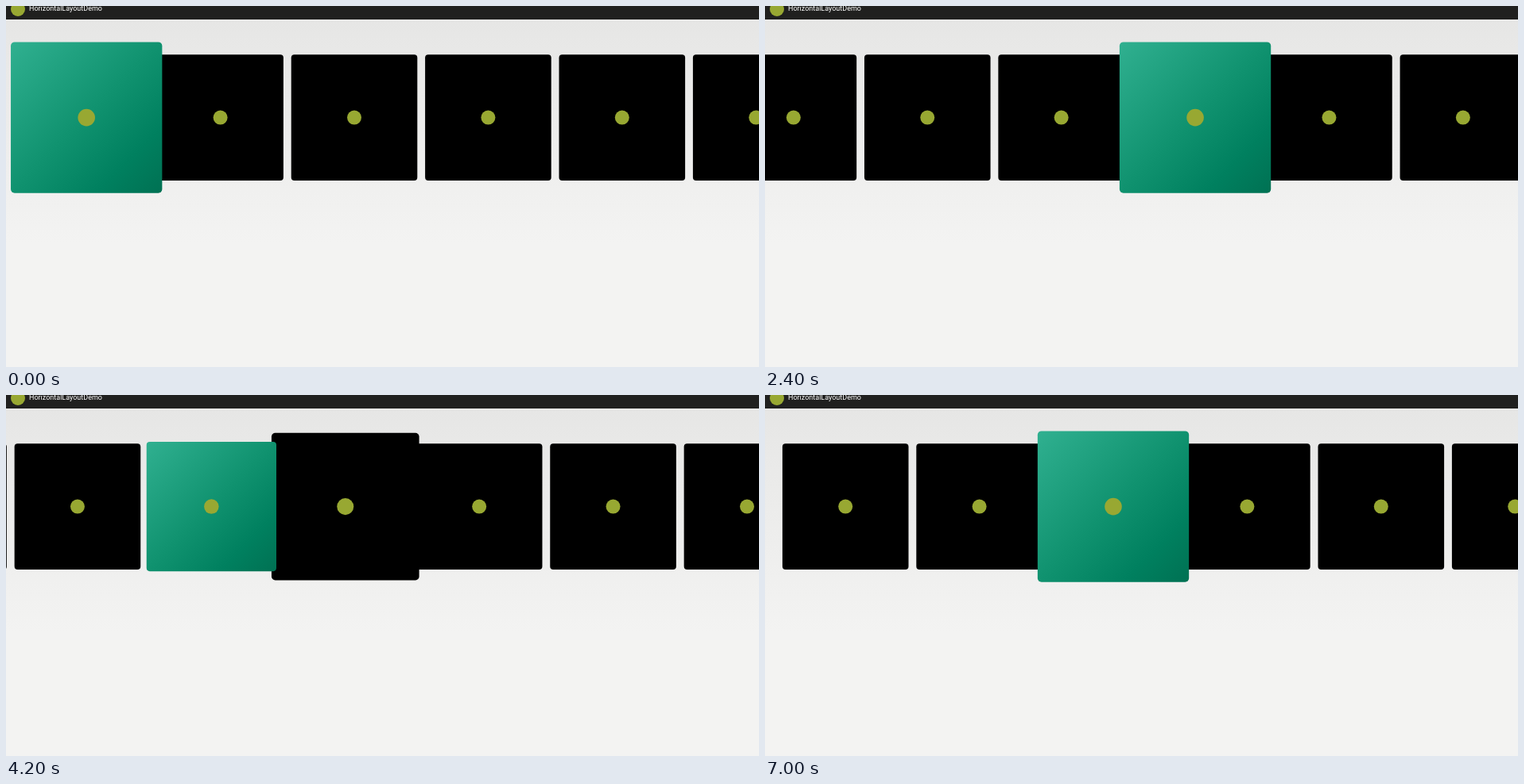
Animation, 947 px wide and 455 px high, one loop 8 s. Source, as an HTML page with a canvas:

```html
<!DOCTYPE html>
<html lang="en">
<head>
<meta charset="utf-8">
<title>Horizontal layout</title>
<style>
  html, body { margin: 0; width: 100%; height: 100%; overflow: hidden; background: #f3f3f2; }
  canvas { display: block; }
</style>
</head>
<body>
<canvas id="stage" width="947" height="455"></canvas>
<script>
const ctx = document.getElementById('stage').getContext('2d');
const WIDTH = 947, HEIGHT = 455, LOOP = 8000, TICK = 100;
const COUNT = 9, CARD = 158.6, PITCH = 168.4, FIRST_X = 101.2, CENTER_Y = 140.6;
const MAX_SCROLL = 613.8, GROWTH = 0.2, SCALE_MS = 180, SCROLL_MS = 380;

// Focus moves: [time, newly focused card]
const moves = [
  [450, 1], [840, 2], [1245, 3], [1540, 4], [1870, 5], [2146, 6], [2500, 7], [2850, 8],
  [3380, 7], [3660, 6], [3935, 5], [4155, 4], [4350, 3], [4555, 2], [4850, 1], [5300, 0],
  [6430, 1], [6790, 2],
];

const clamp = (v, lo, hi) => Math.max(lo, Math.min(hi, v));
const ease = u => 0.5 - 0.5 * Math.cos(Math.PI * clamp(u, 0, 1));
const cardX = i => FIRST_X + PITCH * i;
const scrollTarget = i => clamp(cardX(i) - WIDTH / 2, 0, MAX_SCROLL);

// Each move starts scrolling from wherever the previous one had got to.
function stateAt(time) {
  let focus = 0, previous = 0, from = 0, start = -1e4;
  const scrollAt = t => from + (scrollTarget(focus) - from) * ease((t - start) / SCROLL_MS);
  for (const [at, card] of moves) {
    if (at > time) break;
    from = scrollAt(at);
    previous = focus;
    focus = card;
    start = at;
  }
  return { focus, previous, scroll: scrollAt(time), grown: ease((time - start) / SCALE_MS) };
}

function linear(x0, y0, x1, y1, stops) {
  const gradient = ctx.createLinearGradient(x0, y0, x1, y1);
  for (const [offset, color] of stops) gradient.addColorStop(offset, color);
  return gradient;
}

function disc(x, y, radius) {
  ctx.fillStyle = '#98a832';
  ctx.beginPath();
  ctx.arc(x, y, radius, 0, 2 * Math.PI);
  ctx.fill();
}

const half = CARD / 2;
const green = linear(-half, -half, half, half,
  [[0, '#30b090'], [0.5, '#10926f'], [0.78, '#00805f'], [1, '#007153']]);
const backdrop = linear(0, 17, 0, 300, [[0, '#e6e6e5'], [0.2, '#e9e9e8'], [1, '#f3f3f2']]);

function drawCard(x, scale, fill) {
  ctx.save();
  ctx.translate(x, CENTER_Y);
  ctx.scale(scale, scale);
  ctx.fillStyle = fill;
  ctx.beginPath();
  ctx.roundRect(-half, -half, CARD, CARD, 4);
  ctx.fill();
  disc(0, 0, 9);
  ctx.restore();
}

function drawHeader() {
  ctx.fillStyle = '#20201f';
  ctx.fillRect(0, 0, WIDTH, 17);
  disc(15, 4, 9);
  ctx.fillStyle = '#fff';
  ctx.font = '9px Roboto, sans-serif';
  ctx.fillText('HorizontalLayoutDemo', 29, 6.4);
}

function draw(time) {
  const { focus, previous, scroll, grown } = stateAt(time);
  ctx.fillStyle = backdrop;
  ctx.fillRect(0, 0, WIDTH, HEIGHT);
  drawHeader();
  for (let i = 0; i < COUNT; i++) {
    if (i === focus) continue;
    const scale = i === previous ? 1 + GROWTH * (1 - grown) : 1;
    drawCard(cardX(i) - scroll, scale, '#000');
  }
  drawCard(cardX(focus) - scroll, 1 + GROWTH * grown, green);
}

function frame() {
  const time = performance.now() % LOOP;
  draw(Math.floor(time / TICK) * TICK);
  requestAnimationFrame(frame);
}
frame();
</script>
</body>
</html>
```
